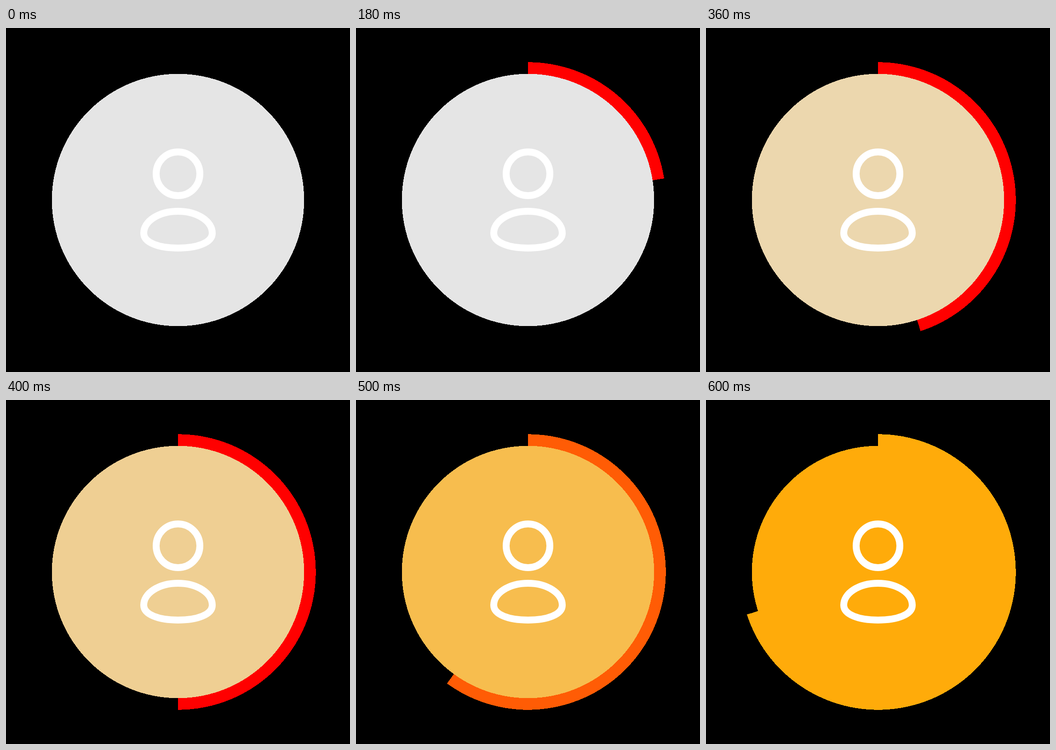
Animation of 748 by 748 pixels, one loop 1.2 s. Source, as an HTML page:

```html
<!DOCTYPE html>
<html lang="en">
<head>
<meta charset="utf-8">
<title>Profile progress</title>
<style>
  html, body { margin: 0; width: 100%; height: 100%; overflow: hidden; background: #000; }
  svg { display: block; width: 100%; height: 100%; }
  .icon { fill: none; stroke: #fff; stroke-width: 15; }
</style>
</head>
<body>
<svg viewBox="0 0 748 748">
  <path id="ring" shape-rendering="crispEdges"/>
  <circle id="disc" cx="374" cy="374" r="274.3" shape-rendering="crispEdges"/>
  <g class="icon">
    <circle cx="374" cy="317" r="47.5"/>
    <path d="M299.5 446A74.5 47.5 0 0 1 448.5 446C448.5 467 415 478.5 374 478.5S299.5 467 299.5 446Z"/>
  </g>
</svg>
<script>
const LOOP = 1200, STEP = 20, C = 374, R = 299.7;
const ring = document.getElementById('ring');
const disc = document.getElementById('disc');

const GREY = [229, 229, 229], RED = [255, 0, 0], AMBER = [255, 171, 10];

// Tables of [time, value]
const sweep = [[0, 0], [400, 180], [600, 252]];
const ringMix = [[400, 0], [460, 0.335], [540, 0.745], [600, 1]];
const discMix = [[280, 0], [600, 1]];

function at(keys, t) {
  if (t <= keys[0][0]) return keys[0][1];
  for (let i = 1; i < keys.length; i++) {
    const [t0, a] = keys[i - 1], [t1, b] = keys[i];
    if (t <= t1) return a + (b - a) * (t - t0) / (t1 - t0);
  }
  return keys[keys.length - 1][1];
}

function blend(a, b, k) {
  return `rgb(${a.map((v, i) => Math.round(v + (b[i] - v) * k)).join(',')})`;
}

function sector(deg) {
  if (deg <= 0) return '';
  const a = deg * Math.PI / 180;
  const x = C + R * Math.sin(a), y = C - R * Math.cos(a);
  return `M${C} ${C}V${C - R}A${R} ${R} 0 ${deg > 180 ? 1 : 0} 1 ${x} ${y}Z`;
}

function draw(now) {
  const t = Math.floor((now % LOOP) / STEP) * STEP;
  ring.setAttribute('d', sector(at(sweep, t)));
  ring.setAttribute('fill', blend(RED, AMBER, at(ringMix, t)));
  disc.setAttribute('fill', blend(GREY, AMBER, at(discMix, t)));
}

const start = performance.now();
function tick() {
  draw(performance.now() - start);
  requestAnimationFrame(tick);
}
tick();
</script>
</body>
</html>
```
